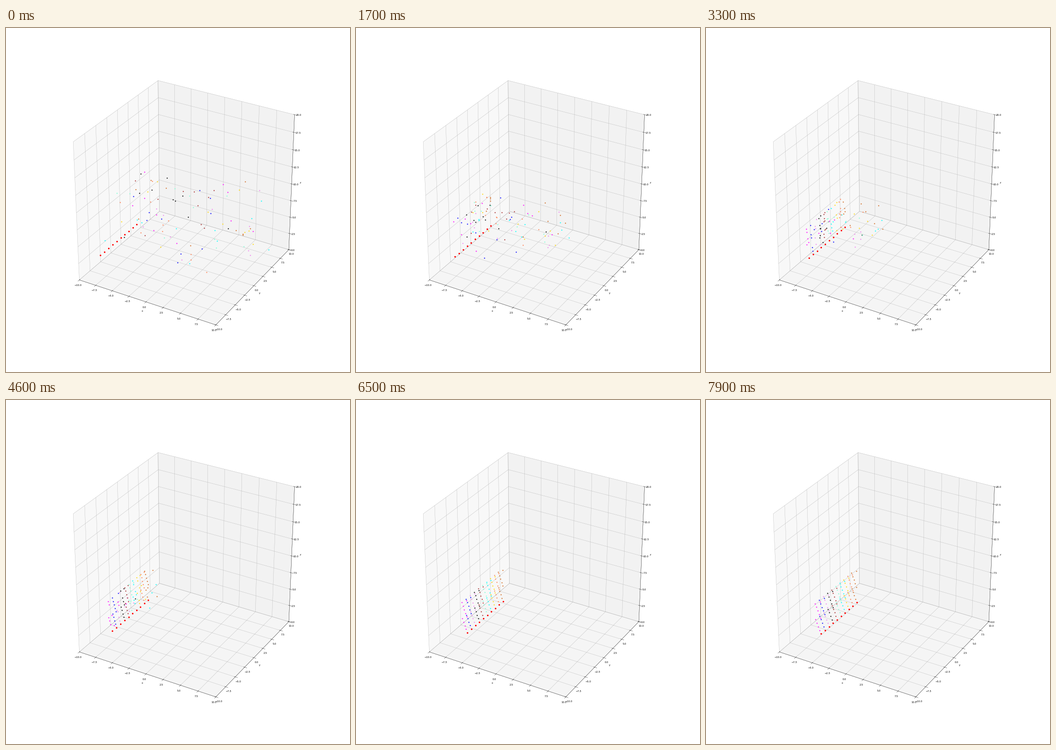
A matplotlib script for the animation above (8000 ms loop, 748 by 748 pixels).

```python
import numpy as np
import matplotlib.pyplot as plt
from matplotlib.animation import FuncAnimation

SIZE, FRAMES = 748, 80
COLORS = ["magenta", "blue", "violet", "black", "brown",
          "aquamarine", "cyan", "gold", "coral", "chocolate"]
N = 10                              # followers behind each leader
DRIFT = 0.04                        # leader step along x
STEP = np.array([0.34, 0.25, 0.15])  # fastest follower step on each axis
LOW, HIGH = (-10, -5, 1), (9.5, 8.5, 10)

fig = plt.figure(figsize=(20, 20), dpi=SIZE / 20)
ax = fig.add_subplot(projection="3d")
ax.set_box_aspect((1, 1, 1))
ax.set(xlim=(-10, 10), ylim=(-10, 10), zlim=(0, 20),
       xlabel="x", ylabel="y", zlabel="z")


def points(color, size):
    return ax.plot([], [], [], "o", color=color, ms=size, mew=0)[0]


swarms = [points(c, 4.4) for c in COLORS]
leaders = points("red", 6.5)

rng = np.random.default_rng(7)
starts = rng.uniform(LOW, HIGH, (len(COLORS), N, 3))
rows = np.arange(len(COLORS)) - 5.0
level = np.arange(1, N + 1)


def slots(row, t):
    """A column over the leader whose links fall behind little by little."""
    lag = 0.2 * (level % 5) * (1 - np.exp(-max(t - 25, 0) / 20))
    x = -10 + DRIFT * t - lag
    return np.column_stack([x, np.full(N, row), 1 + 0.485 * level])


def follow(start, row, t):
    """Close the gap on each axis at constant speed, then stay in the slot."""
    gap = start - slots(row, 0)
    left = np.maximum(np.abs(gap) - STEP * t, 0)
    return slots(row, t) + np.sign(gap) * left


def update(t):
    for dots, start, row in zip(swarms, starts, rows):
        dots.set_data_3d(*follow(start, row, t).T)
    ones = np.ones(len(rows))
    leaders.set_data_3d((-10 + DRIFT * t) * ones, rows, ones)
    return *swarms, leaders


anim = FuncAnimation(fig, update, frames=FRAMES, interval=100,
                     repeat=True, repeat_delay=0)
plt.show()
```
